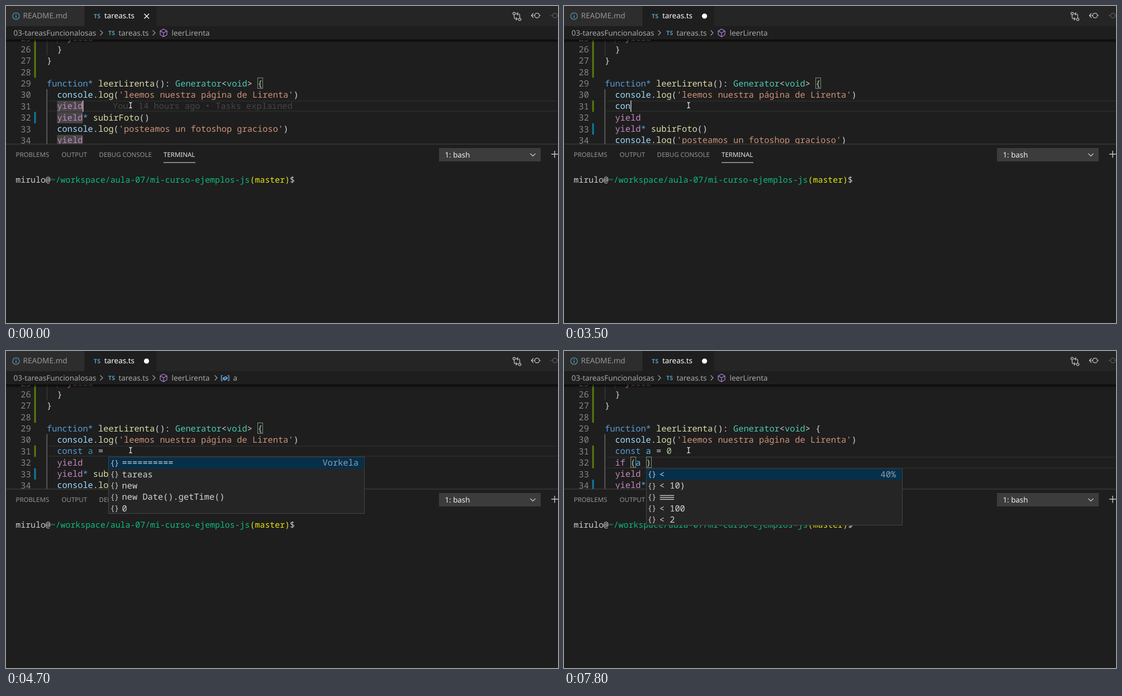
Animation of 988 by 567 pixels, one loop 8000 ms. Source, as an HTML page with a canvas:

```html
<!DOCTYPE html>
<html lang="es">
<head>
<meta charset="utf-8">
<title>Editor</title>
<style>
html, body { margin: 0; width: 100%; height: 100%; overflow: hidden; background: #1e1e1e; }
canvas { display: block; }
</style>
</head>
<body>
<canvas id="stage" width="988" height="567"></canvas>
<script>
const ctx = document.getElementById('stage').getContext('2d');
const LOOP = 8000;
const CHAR = 9.2, ROW = 20.35, LEFT = 73;
const MONO = '"Noto Sans Mono", monospace', UI = '"Noto Sans", sans-serif';
const CODE = '15.333px ' + MONO;
const colX = col => LEFT + col * CHAR;
const rowY = row => 169 + (row - 31) * ROW;

const HEAD = ['    yield', '  }', '}', '', 'function* leerLirenta(): Generator<void> {',
  "  console.log('leemos nuestra página de Lirenta')"];
const TAIL = ['  yield', '  yield* subirFoto()', "  console.log('posteamos un fotoshop gracioso')", '  yield'];
const NOTE = 'You, 14 hours ago • Tasks explained';

const BRACE = [[29, 41]];
const parens = close => [[32, 5], [32, close]];
const typed = (text, extra) => ({ added: [text], col: text.length + 2, on: 1, popup: null, ...extra });
const inIf = (text, col, extra) => ({ added: ['const a = 0', text], col, on: 1, popup: null, ...extra });
const popup = (row, col, items, label = '') => ({ popup: { row, col, items, label } });

// Each step changes some fields of the editor state from its time on.
const STEPS = [
  [0, { row: 31, col: 7, on: 1, mark: 'yield', braces: BRACE, note: 31, tip: 0, added: [], green: 0 }],
  [200, { on: 0 }],
  [400, { tip: 0.5 }],
  [500, { tip: 1 }],
  [700, { on: 1 }],
  [900, { row: 30, tip: 0, mark: '', note: 0 }],
  [1100, { mark: 'console', note: 30 }],
  [1200, { col: 49, mark: '', note: 0 }],
  [1300, { braces: [[30, 13], [30, 48]] }],
  [1400, { note: 30 }],
  [1800, { on: 0 }],
  [2000, typed('', { row: 31, dirty: true, note: 0, braces: BRACE })],
  [2200, { green: 1 }],
  [2700, { on: 0 }],
  [3100, { on: 1 }],
  [3400, typed('c')],
  [3500, typed('con')],
  [3600, typed('cons')],
  [3700, typed('const')],
  [3800, typed('const a', popup(31, 9, ['=', '= new', '= 0', '= 1', '= 2', '= 10', '= tareas',
    '= []', '= {}', '= true', '= false', '= null']))],
  [3900, typed('const a ')],
  [4100, typed('const a =')],
  [4200, typed('const a = ')],
  [4300, popup(31, 12, ['==========', 'tareas', 'new', 'new Date().getTime()', '0'], 'Vorkela')],
  [4600, { crumb: true }],
  [4700, { on: 0, dim: true }],
  [5100, typed('const a = 0')],
  [5600, inIf('', 2, { row: 32 })],
  [5800, { green: 2 }],
  [5900, { crumb: false }],
  [6100, { on: 0 }],
  [6400, inIf('if', 4)],
  [6600, inIf('if ()', 6, { braces: [] })],
  [6700, { braces: parens(6), ...popup(32, 6, ['a', 'tareas', 'true', '!'], 'Vorkela') }],
  [6900, inIf('if (a)', 7, { braces: parens(7) })],
  [7000, popup(32, 7, ['===', '< 0', '< 10', '> 0', ')'], 'Vorkela')],
  [7400, inIf('if (a )', 8, { braces: parens(8) })],
  [7500, { dim: false }],
  [7600, popup(32, 8, ['<', '< 10)', '===', '< 100', '< 2'], '40%')],
  [7800, { on: 0 }]
];

const stateAt = time => Object.assign({}, ...STEPS.filter(([at]) => at <= time).map(([, change]) => change));

function rect(x, y, w, h, color) {
  ctx.fillStyle = color;
  ctx.fillRect(x, y, w, h);
}
function text(str, x, y, color, font, align = 'left') {
  ctx.font = font;
  ctx.fillStyle = color;
  ctx.textAlign = align;
  ctx.fillText(str, x, y);
}
function path(d, color, width = 1.2) {
  ctx.strokeStyle = color;
  ctx.lineWidth = width;
  ctx.stroke(new Path2D(d));
}
function circle(x, y, r, color, filled) {
  ctx.beginPath();
  ctx.arc(x, y, r, 0, Math.PI * 2);
  ctx.fillStyle = ctx.strokeStyle = color;
  ctx.lineWidth = 1.2;
  filled ? ctx.fill() : ctx.stroke();
}
function frame(x, y, w, h, fill, border) {
  rect(x, y, w, h, fill);
  ctx.strokeStyle = border;
  ctx.lineWidth = 1;
  ctx.strokeRect(Math.round(x) + 0.5, Math.round(y) + 0.5, Math.round(w) - 1, Math.round(h) - 1);
}

const TOKEN = /'[^']*'|[\wá]+(?=\()|\w+|\s+|[^\w\s]/g;
function tokenColor(token, next) {
  if (token[0] === "'") return '#ce9178';
  if (/^(function|const|\*)$/.test(token)) return '#569cd6';
  if (/^(yield|if)$/.test(token)) return '#c586c0';
  if (/^(Generator|void)$/.test(token)) return '#4ec9b0';
  if (/^\d/.test(token)) return '#b5cea8';
  if (token === 'a') return '#4fc1ff';
  if (/^\w/.test(token)) return next === '(' ? '#dcdcaa' : '#9cdcfe';
  return '#d4d4d4';
}
function codeLine(line, row, dim) {
  for (const match of line.matchAll(TOKEN)) {
    const token = match[0];
    const color = dim && token === 'a' ? '#3f8bb4' : tokenColor(token, line[match.index + token.length]);
    text(token, colX(match.index), rowY(row) + 15.3, color, CODE);
  }
}

function drawEditor(s) {
  ctx.save();
  ctx.beginPath();
  ctx.rect(0, 60, 988, 187);
  ctx.clip();

  rect(76, Math.round(rowY(s.row)), 912, 2, '#282828');
  rect(76, Math.round(rowY(s.row + 1)) - 2, 912, 2, '#282828');
  rect(LEFT, 60, 1, 28, '#404040');
  rect(91, 60, 1, 7, '#404040');
  rect(LEFT - 0.5, rowY(30), 1.5, 100, '#686868');

  rect(50.5, 60, 3, 68.3, '#587c0c');
  rect(50.5, rowY(31), 3, s.green * ROW, '#587c0c');
  rect(50.5, rowY(32 + s.added.length), 3, ROW, '#0c7d9d');

  const lines = [...HEAD, ...s.added.map(line => '  ' + line), ...TAIL];
  lines.forEach((line, i) => {
    const row = 25 + i;
    if (row > 34) return;
    if (s.mark && row > 29 && line.trim().startsWith(s.mark))
      rect(colX(2), rowY(row) + 0.5, s.mark.length * CHAR, ROW - 0.5, '#474747');
    text(row, 44.6, rowY(row) + 15.8, '#858585', CODE, 'right');
    codeLine(line, row, s.dim && row === 31);
  });

  for (const [row, col] of s.braces)
    frame(colX(col), rowY(row), CHAR + 0.5, ROW, 'rgba(0,100,0,.1)', '#858585');
  if (s.note)
    text(NOTE, colX(s.note === 31 ? 7 : 49) + 53.6, rowY(s.note) + 15.3, '#454545', CODE);
  if (s.on) rect(Math.round(colX(s.col)), rowY(s.row), 1.5, ROW, '#c4c4c2');

  const shadow = ctx.createLinearGradient(0, 60, 0, 66);
  shadow.addColorStop(0, 'rgba(0,0,0,.75)');
  shadow.addColorStop(1, 'rgba(0,0,0,0)');
  rect(0, 60, 988, 6, shadow);
  ctx.restore();
}

function drawTip(alpha) {
  ctx.globalAlpha = alpha;
  frame(137, 69, 351, 102, '#252526', '#454545');
  text('You, 14 hours ago', 147, 92, '#cccccc', '13.4px ' + UI);
  text('Tasks explained', 147, 124, '#cccccc', '13.4px ' + UI);
  rect(138, 141, 349, 1, '#3c3c3d');
  ctx.globalAlpha = 1;
}

function drawPopup({ row, col, items, label }) {
  const x = colX(col), y = rowY(row + 1);
  frame(x, y, 459, items.length * 20.2 + 1, '#252526', '#454545');
  rect(x + 1, y + 1, 457, 20, '#062f4a');
  items.forEach((item, i) => {
    const base = y + 16 + i * 20.3;
    text('{', x + 3, base - 0.5, '#c5c5c5', '14px ' + MONO);
    text('}', x + 10.5, base - 0.5, '#c5c5c5', '14px ' + MONO);
    if (item === '===') for (const dy of [-8.5, -5, -1.5]) rect(x + 25, base + dy, 25.5, 1.3, '#d4d4d4');
    else text(item, x + 24.2, base, '#d4d4d4', CODE);
  });
  text(label, x + 447.5, y + 16, '#8ba0b0', CODE, 'right');
}

function drawPointer() {
  const beam = 'M220.5 172.5Q223 172.5 223 174.5Q223 172.5 225.5 172.5M223 174V181M220.5 182.5Q223 182.5 223 180.5Q223 182.5 225.5 182.5';
  path(beam, '#1e1e1e', 4);
  path(beam, '#e0e0e0', 1.3);
}

function drawTabs(dirty) {
  rect(0, 0, 988, 36, '#252526');
  rect(0, 0, 140, 36, '#2d2d2d');
  rect(141, 0, 128, 36, '#1e1e1e');
  circle(18, 18, 6, '#519aba');
  path('M18 14V15.5M18 17V21.5', '#519aba', 1.5);
  text('README.md', 30.5, 22.3, '#969696', '13.6px ' + UI);
  text('TS', 157, 21.7, '#519aba', 'bold 10.6px ' + UI);
  text('tareas.ts', 176, 22.3, '#ffffff', '13.4px ' + UI);
  if (dirty) circle(251.5, 18, 4.6, '#ffffff', true);
  else path('M247.5 14L256 22.5M256 14L247.5 22.5', '#ffffff', 1.4);

  circle(909.5, 13.5, 2.2, '#c5c5c5');
  circle(919.5, 24, 2.2, '#c5c5c5');
  path('M909.5 16V20Q909.5 23 912.5 23H915M912.5 20.3L915.2 23L912.5 25.7M919.5 21.5V17Q919.5 14 916.5 14H914M916.5 11.3L913.8 14L916.5 16.7', '#c5c5c5');
  circle(950.5, 17, 4.2, '#c5c5c5');
  path('M946 17H940.5M944 13L940.3 17L944 21M954.7 17H957', '#c5c5c5');
  circle(982.5, 17, 4.2, '#5c5c5c');
  path('M974 17H978.3M986.7 17H988', '#5c5c5c');
}

const chevron = x => path(`M${x - 2.5} 43.5L${x + 2} 48L${x - 2.5} 52.5`, '#a0a0a0');
function drawCrumbs(inConst) {
  const label = (str, x) => text(str, x, 52.7, '#a9a9a9', '13.4px ' + UI);
  label('03-tareasFuncionalosas', 13.5);
  chevron(171);
  text('TS', 183, 52, '#519aba', 'bold 10.6px ' + UI);
  label('tareas.ts', 201.5);
  chevron(265);
  path('M282 41.3L288 44.5V51.5L282 55L276 51.5V44.5ZM276 44.5L282 48L288 44.5M282 48V55', '#b180d7');
  label('leerLirenta', 296.5);
  if (!inConst) return;
  chevron(376);
  path('M388 44H385.5V53H388M396.5 44H399V53H396.5M388.5 48.5L393 46L396 47.5V49.5L391.5 52L388.5 50.5ZM388.5 48.5L391.5 50L396 47.5', '#75beff');
  label('a', 406.5);
}

function drawPanel() {
  rect(0, 247, 988, 320, '#1e1e1e');
  rect(0, 246.5, 988, 1, '#454545');
  const tab = (str, x, color) => text(str, x, 270.2, color, '11.5px ' + UI);
  tab('PROBLEMS', 17.5, '#949494');
  tab('OUTPUT', 99.5, '#949494');
  tab('DEBUG CONSOLE', 166.5, '#949494');
  tab('TERMINAL', 282, '#e7e7e7');
  rect(282, 279.5, 57, 1, '#e7e7e7');
  rect(775, 254, 182, 24, '#3c3c3c');
  text('1: bash', 785.5, 270.8, '#f0f0f0', '13.3px ' + UI);
  path('M938.5 264L943 268.5L947.5 264', '#d0d0d0');
  path('M976 265H988M982 259V271.5', '#c5c5c5', 1.4);

  let x = 17.3;
  const prompt = [['mirulo@', '#cccccc'], ['~/workspace/aula-07/mi-curso-ejemplos-js', '#0dbc79'],
    ['(master)', '#e5e510'], ['$', '#cccccc']];
  for (const [part, color] of prompt) {
    text(part, x, 316, color, '14.87px ' + MONO);
    x += part.length * 8.922;
  }
}

function draw() {
  const s = stateAt(performance.now() % LOOP);
  ctx.textRendering = 'geometricPrecision';
  rect(0, 0, 988, 567, '#1e1e1e');
  drawEditor(s);
  drawTabs(s.dirty);
  drawCrumbs(s.crumb);
  drawPanel();
  if (s.tip) drawTip(s.tip);
  if (s.popup) drawPopup(s.popup);
  drawPointer();
  requestAnimationFrame(draw);
}
draw();
</script>
</body>
</html>
```
